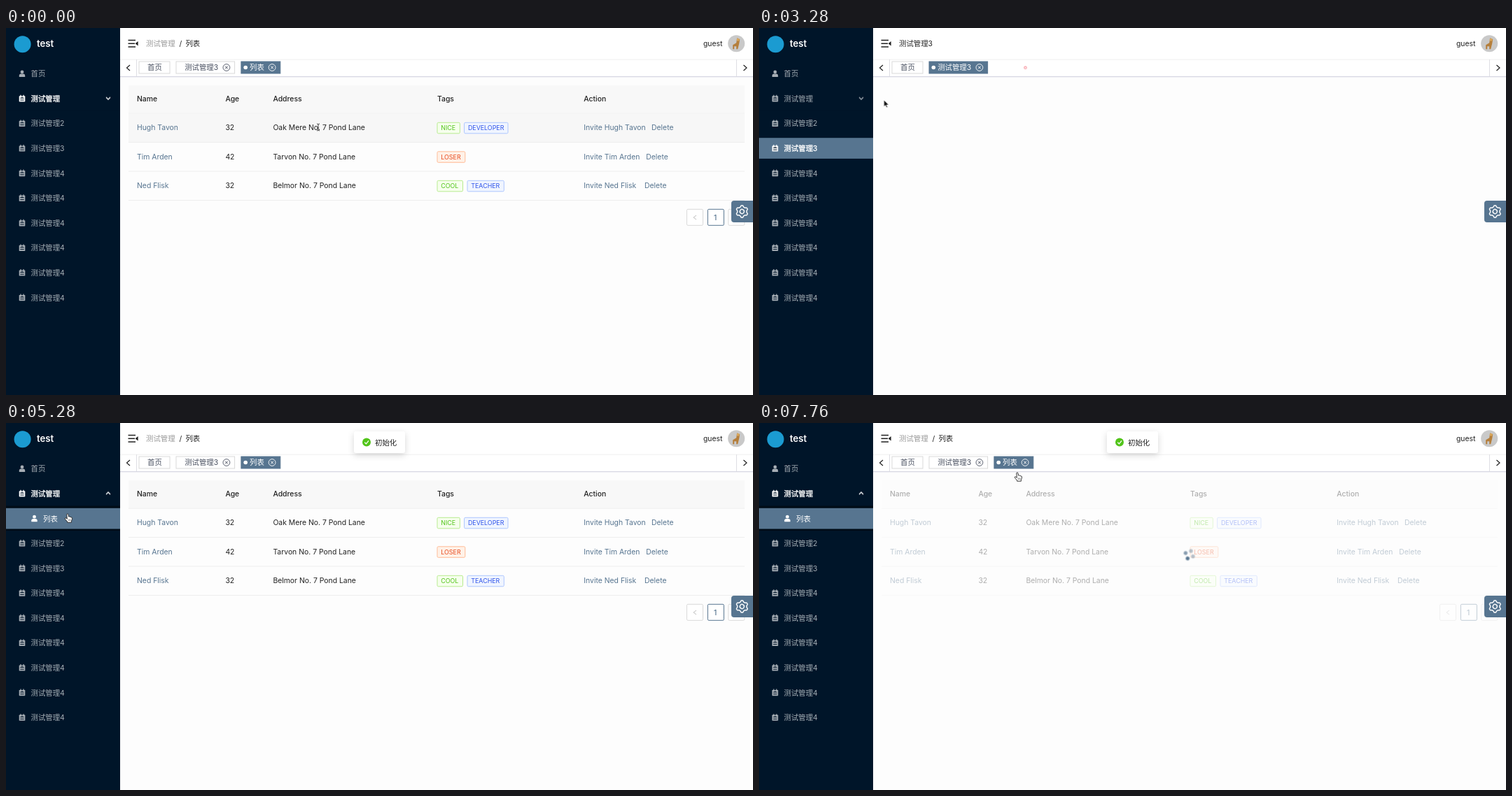
Animation, 1067 px wide and 525 px high, one loop 8000 ms. Source, as an HTML page:

```html
<!DOCTYPE html>
<html lang="zh-CN">
<head>
<meta charset="utf-8">
<title>Tabs</title>
<style>
html, body { margin: 0; width: 100%; height: 100%; overflow: hidden; background: #fdfdfd; }
svg { display: block; --blue: #577590; --io: cubic-bezier(.645, .045, .355, 1); }
text { font: 10.4px Inter, "Noto Sans CJK SC", "Noto Sans CJK", sans-serif; fill: currentColor; white-space: pre; }
.b { font-weight: 500; }
.tag text { font-size: 8.9px; }
.link { color: var(--blue); }
.line { fill: none; stroke: currentColor; }

.anim { animation: 8s linear infinite; }
.step { animation: 8s step-end infinite; }
.side { color: #fff; stroke: #fff; stroke-width: 0; }
.dim { opacity: .65; }

.parent { animation-name: parent; }
@keyframes parent {
  0%, 20% { opacity: 1; stroke-width: .3px; }
  25%, 43% { opacity: .65; stroke-width: 0; }
  46%, 100% { opacity: 1; stroke-width: .3px; }
}
.flip { animation-name: flip; }
@keyframes flip {
  0%, 48% { transform: scaleY(1); animation-timing-function: var(--io); }
  51.75%, 100% { transform: scaleY(-1); }
}
.lower { animation-name: lower; }
@keyframes lower {
  0%, 48% { transform: none; animation-timing-function: var(--io); }
  51.75%, 100% { transform: translateY(35.6px); }
}
.pick3 { animation-name: pick3; }
@keyframes pick3 {
  0%, 20% { opacity: 0; animation-timing-function: var(--io); }
  23.75%, 53.75% { opacity: 1; animation-timing-function: var(--io); }
  57.5%, 100% { opacity: 0; }
}
.text3 { animation-name: text3; }
@keyframes text3 {
  0%, 20% { opacity: .65; stroke-width: 0; }
  23.75%, 53.75% { opacity: 1; stroke-width: .3px; }
  57.5%, 100% { opacity: .65; stroke-width: 0; }
}
.pickList { animation-name: pickList; }
@keyframes pickList {
  0%, 53.75% { opacity: 0; animation-timing-function: var(--io); }
  57.5%, 100% { opacity: 1; }
}
.submenu { animation-name: submenu; }
@keyframes submenu { 0% { opacity: 0; } 48%, 100% { opacity: 1; } }

.bg2 { animation-name: bg2; }
@keyframes bg2 {
  0%, 20% { fill: #fff; stroke: #d9d9d9; animation-timing-function: ease; }
  24.4%, 53.75% { fill: #577590; stroke: #577590; animation-timing-function: ease; }
  58.1%, 100% { fill: #fff; stroke: #d9d9d9; }
}
.bg3 { animation-name: bg3; }
@keyframes bg3 {
  0%, 20% { fill: #577590; stroke: #577590; animation-timing-function: ease; }
  24.4%, 53.74% { fill: #fff; stroke: #d9d9d9; }
  53.75%, 100% { fill: #577590; stroke: #577590; }
}
.ink2 { animation-name: ink2; }
@keyframes ink2 { 0%, 53.75%, 100% { color: #495060; } 20% { color: #fff; } }
.ink3 { animation-name: ink3; }
@keyframes ink3 { 0%, 53.75%, 100% { color: #fff; } 20% { color: #495060; } }
.onPage3 { animation-name: onPage3; }
@keyframes onPage3 { 0%, 53.75%, 100% { opacity: 0; } 20% { opacity: 1; } }
.onList { animation-name: onList; }
@keyframes onList { 0%, 53.75%, 100% { opacity: 1; } 20% { opacity: 0; } }
.tab3 { animation-name: tab3; }
@keyframes tab3 { 0%, 53.75%, 100% { opacity: 1; } 39% { opacity: 0; } }
.shut { animation-name: shut; }
@keyframes shut {
  0%, 36.49% { opacity: 0; transform: scale(1); }
  36.5%, 39% { opacity: 1; transform: scale(1); }
  41%, 41.4% { opacity: 1; transform: scale(.35); }
  42%, 100% { opacity: 0; transform: scale(0); }
}
.crumb3 { animation-name: crumb3; }
@keyframes crumb3 { 0%, 20% { color: #999; } 24%, 100% { color: #262626; } }
.crumb1 { animation-name: crumb1; }
@keyframes crumb1 { 0%, 20% { color: #999; } 53.75% { color: #333; } 58%, 100% { color: #999; } }

.table { animation-name: table; }
@keyframes table {
  0%, 20% { opacity: 1; } 20.01%, 53.74% { opacity: 0; }
  53.75%, 58.5% { opacity: .38; } 62.5%, 90% { opacity: 1; } 93.75%, 100% { opacity: .36; }
}
.hover { animation-name: hover; }
@keyframes hover { 0%, 1.5% { opacity: 1; } 5%, 100% { opacity: 0; } }
.spinner { animation-name: spinner; }
@keyframes spinner {
  0%, 53.75% { opacity: 0; } 57.5%, 58.5% { opacity: 1; }
  62%, 90% { opacity: 0; } 93.75%, 100% { opacity: 1; }
}
.turn { animation-name: turn; }
@keyframes turn { from { transform: rotate(36deg); } to { transform: rotate(2436deg); } }
.blink { animation: blink 1s linear infinite alternate; }
@keyframes blink { from { opacity: .3; } to { opacity: 1; } }
.message { animation-name: message; }
@keyframes message {
  0%, 54% { opacity: 0; transform: translateY(-31px); animation-timing-function: cubic-bezier(.08, .82, .17, 1); }
  57.7%, 100% { opacity: 1; transform: none; }
}

.pointer { animation-name: pointer; animation-timing-function: ease-in-out; }
@keyframes pointer {
  0%, .5% { transform: translate(446px, 142px); }
  8% { transform: translate(367px, 62px); }
  10.5%, 12.5% { transform: translate(366px, 56px); }
  18%, 25% { transform: translate(292px, 52px); }
  30% { transform: translate(350px, 56px); }
  34% { transform: translate(352px, 56px); }
  37%, 39% { transform: translate(380px, 56px); animation-timing-function: ease-in; }
  41% { transform: translate(179px, 103px); animation-timing-function: ease-out; }
  44% { transform: translate(95px, 100px); }
  45.5%, 49% { transform: translate(88px, 98px); }
  52.5%, 66% { transform: translate(88px, 130px); }
  73.5%, 81% { transform: translate(350px, 52px); }
  88%, 91% { transform: translate(364px, 57px); }
  96.5%, 100% { transform: translate(369px, 71px); }
}
.beam { animation-name: beam; }
@keyframes beam { 0% { opacity: 1; } 2%, 100% { opacity: 0; } }
.arrow { animation-name: arrow; }
@keyframes arrow {
  0%, 7%, 44%, 72%, 100% { opacity: 0; }
  2%, 39.2%, 66.5% { opacity: 1; }
}
.hand { animation-name: hand; }
@keyframes hand {
  0%, 39.2%, 66.5% { opacity: 0; }
  7%, 44%, 72%, 100% { opacity: 1; }
}
</style>
</head>
<body>
<script>
const text = (x, y, s, cls = '') => `<text x="${x}" y="${y}" class="${cls}">${s}</text>`;
const rect = (x, y, w, h, attrs = '') => `<rect x="${x}" y="${y}" width="${w}" height="${h}" ${attrs}/>`;
const dot = (x, y, r, attrs = 'fill="currentColor"') => `<circle cx="${x}" cy="${y}" r="${r}" ${attrs}/>`;
const path = (d, attrs = 'class="line"') => `<path d="${d}" ${attrs}/>`;
const group = (cls, ...parts) => `<g class="${cls}">${parts.join('')}</g>`;
const at = (x, y, ...parts) => `<g transform="translate(${x} ${y})">${parts.join('')}</g>`;

const person = (x, y) => at(x, y, dot(0, -2.3, 2.4, 'fill="#fff" stroke="none"'),
  path('M-4.2 4.8V3Q-4.2 .4-1.5 .4H1.5Q4.2 .4 4.2 3V4.8Z', 'fill="#fff" stroke="none"'));
const badge = (x, y) => at(x, y, rect(-4.3, -3.6, 8.6, 8.2, 'rx=".6" fill="#fff" stroke="none"'),
  path('M-2-5V-2.4M2-5V-2.4', 'stroke="#fff" stroke-width="1.3"'),
  path('M-2.7-.6H2.7M-2.7 2.2H2.7M0-2.5V-.6', 'stroke="#001529" stroke-width="1"'));
const item = (y, label, cls = 'dim', icon = badge, x = 23) =>
  group('side ' + cls, icon(x, y), text(x + 12.5, y + 4, label));

const pickBar = (y, cls) => rect(0, y, 163, 29.7, `class="anim ${cls}" fill="#577590"`);
const lowerLabels = [2, 3, 4, 4, 4, 4, 4, 4];
const sidebar = [
  rect(0, 0, 163, 525, 'fill="#001529"'),
  dot(23.6, 23.3, 12, 'fill="#1b9bd1"'),
  `<text x="44" y="27" style="font-size:13.2px;font-weight:600;color:#fff">test</text>`,
  item(65.2, '首页', 'dim', person),
  group('step submenu', rect(0, 118.5, 163, 36, 'fill="#000c17"'),
    pickBar(121.8, 'pickList'), item(136.5, '列表', '', person, 40.5)),
  group('anim lower', rect(0, 118.6, 163, 410, 'fill="#001529"'), pickBar(157.2, 'pick3'),
    ...lowerLabels.map((n, i) => item(136.4 + i * 35.6, '测试管理' + n, n === 3 ? 'anim text3' : 'dim'))),
  item(100.8, '测试管理', 'anim parent'),
  group('side anim parent', at(146, 100.6, group('anim flip',
    path('M-3-1.5L0 1.5L3-1.5', 'fill="none" stroke="#fff" stroke-width="1.3"'))))
];

const cross = (x, y) => at(x, y, dot(0, 0, 4.9, 'class="line" stroke-width=".9"'),
  path('M-1.9-1.9L1.9 1.9M1.9-1.9L-1.9 1.9'));
const tab = (x, w, label, n, onCls) => rect(x, 48, w, 17, `class="anim bg${n}"`) +
  group('step ink' + n, dot(x + 6.3, 56.5, 2.8, `fill="#fff" class="step ${onCls}"`),
    text(x + 12.2, 60.3, label), cross(x + w - 11.7, 56.5));

const giraffe = at(1043.2, 22.2, dot(0, 0, 12, 'fill="#c9c9c9"'),
  path('M-5 8V2L0-1L1-8L5-6L4 0L2 8H0V4L-3 4V8Z', 'fill="#b57f3c"'),
  dot(2.4, -5.5, 2, 'fill="#d9a75c"'));

const header = [
  rect(163, 0, 904, 69, 'fill="#fff"'),
  path('M163 45.2H1067', 'stroke="#efefef"'),
  path('M163 69.7H1067', 'stroke="#d6d6e2" stroke-width="1.2"'),
  path('M186.5 45V69M1043.5 45V69', 'stroke="#dedee4"'),
  path('M174.5 17.5H185M174.5 22.2H184M174.5 27H185', 'stroke="#222" stroke-width="1.6"'),
  path('M188.6 19V25.4L184.6 22.2Z', 'fill="#222"'),
  path('M177 53L172.5 57L177 61M1053.5 53L1058 57L1053.5 61', 'fill="none" stroke="#222" stroke-width="1.2"'),
  group('step onList', text(200, 26, '测试管理', 'anim crumb1'),
    group('', `<text x="247.5" y="26" fill="#777">/</text>`), text(256.4, 26, '列表')),
  group('step onPage3', text(200, 26, '测试管理3', 'anim crumb3')),
  text(996, 26, 'guest'), giraffe,
  rect(190, 48, 44, 17, 'fill="#fff" stroke="#d9d9d9"'),
  `<g color="#495060">${text(202, 60.3, '首页')}</g>`,
  tab(243, 83.6, '测试管理3', 2, 'onPage3'),
  group('step tab3', tab(335.9, 55.9, '列表', 3, 'onList')),
  at(380.5, 56.7, group('anim shut', dot(0, 0, 4.9, 'fill="none" stroke="#f04a5a" stroke-width="2"')))
];

const tones = {
  green: ['#52c41a', '#f6ffed', '#b7eb8f'],
  blue: ['#2f54eb', '#f0f5ff', '#adc6ff'],
  red: ['#e8481c', '#fff2e8', '#ffbb96']
};
const tag = ([x, w, label, tone], y) => {
  const [ink, fill, edge] = tones[tone];
  return `<g class="tag" color="${ink}">${rect(x, y - 7.5, w, 15.5, `rx="1.5" fill="${fill}" stroke="${edge}"`)}
    ${text(x + 5.3, y + 3.5, label)}</g>`;
};
const rows = [
  ['Hugh Tavon', 32, 'Oak Mere No. 7 Pond Lane', 922, [[616, 32.3, 'NICE', 'green'], [654.6, 62.4, 'DEVELOPER', 'blue']]],
  ['Tim Arden', 42, 'Tarvon No. 7 Pond Lane', 914.3, [[616, 39.8, 'LOSER', 'red']]],
  ['Ned Flisk', 32, 'Belmor No. 7 Pond Lane', 912, [[616, 36.5, 'COOL', 'green'], [659, 52.3, 'TEACHER', 'blue']]]
];
const row = ([name, age, address, deleteX, tags], i) => {
  const y = 142.8 + i * 41.5;
  return text(187, y + 3.6, name, 'link') + text(313.4, y + 3.6, age) + text(381.4, y + 3.6, address) +
    tags.map(t => tag(t, y)).join('') + text(825.3, y + 3.6, 'Invite ' + name, 'link') +
    text(deleteX, y + 3.6, 'Delete', 'link') + path(`M175 ${y + 20.7}H1055`, 'stroke="#eeeeee"');
};
const columns = [[187, 'Name'], [313.4, 'Age'], [381.4, 'Address'], [616, 'Tags'], [825.3, 'Action']];
const table = group('anim table',
  rect(175, 82, 880, 40, 'fill="#f8f8f8"'), path('M175 122.2H1055', 'stroke="#eeeeee"'),
  rect(175, 122.5, 880, 41, 'class="anim hover" fill="#f7f7f7"'),
  ...columns.map(([x, label]) => text(x, 105.2, label, 'b')),
  ...rows.map(row),
  ...[[972.5, '#d9d9d9'], [1002.4, '#577590'], [1031.8, '#d9d9d9']].map(([x, edge]) =>
    rect(x, 259.3, 23, 23, `rx="1.5" fill="#fff" stroke="${edge}"`)),
  path('M986 268L982 271L986 274', 'fill="none" stroke="#c0c0c0"'),
  text(1011, 274.6, '1', 'link b'));

const spinner = at(614.6, 188.4, group('anim spinner', group('anim turn',
  ...[-.84, -.44, -.04, -1.24].map((delay, i) =>
    `<g transform="rotate(${i * 90})">${dot(5.8, 0, 2.7, `fill="#577590" class="blink" style="animation-delay:${delay}s"`)}</g>`))));

const gearPoint = i => {
  const a = (i * 15 - 7.5) * Math.PI / 180, r = i % 4 < 2 ? 8.6 : 6.7;
  return `${(r * Math.cos(a)).toFixed(2)} ${(r * Math.sin(a)).toFixed(2)}`;
};
const gear = path('M1067 247H1040Q1036 247 1036 251V274Q1036 278 1040 278H1067Z', 'fill="#577590"') +
  at(1051.3, 262.5, `<g transform="rotate(30)" fill="none" stroke="#fff" stroke-width="1.4" stroke-linejoin="round">
    ${path('M' + Array.from({ length: 24 }, (_, i) => gearPoint(i)).join('L') + 'Z', '')}${dot(0, 0, 3, '')}</g>`);

const message = group('anim message',
  rect(497, 12, 73, 31, 'rx="3" fill="#fff" style="filter:drop-shadow(0 3px 5px rgba(0,0,0,.16))"'),
  dot(515, 27.6, 6, 'fill="#52c41a"'),
  path('M512.2 27.6L514.4 29.8L518 25.4', 'fill="none" stroke="#fff" stroke-width="1.3"'),
  text(527, 31.5, '初始化'));

const pointer = group('anim pointer',
  group('step beam', path('M-2-5Q0-5 0-3.5V3.5Q0 5-2 5M2-5Q0-5 0-3.5M0 3.5Q0 5 2 5M-1 1H1', 'fill="none" stroke="#333" stroke-width=".9"')),
  group('step arrow', path('M0 0V9.6L2.2 7.6L3.7 11L5.3 10.3L3.8 7H6.8Z', 'fill="#111" stroke="#fff" stroke-width=".7"')),
  group('step hand', path('M-1.2 1Q-1 -.3 0-.2Q1 0 1.1 1.2L1.4 4Q2.6 3.3 3.2 4.4Q4.4 3.8 4.9 5Q6.4 4.7 6.5 6.2Q6.5 8.6 5.4 10.2V12.2H-.4V11L-3.6 7.4Q-4.3 6-3 5.8Q-2 6-.7 7.3Z',
    'fill="#fff" stroke="#222" stroke-width=".9" stroke-linejoin="round"'),
    path('M1.2 7.5V10M2.7 7.5V10M4.1 7.5V10', 'stroke="#555" stroke-width=".6"')));

document.body.innerHTML = `<svg width="1067" height="525" viewBox="0 0 1067 525" color="#222">
  ${rect(0, 0, 1067, 525, 'fill="#fdfdfd"')}
  ${[table, spinner, ...header, ...sidebar, gear, message, pointer].join('')}
</svg>`;
</script>
</body>
</html>
```
